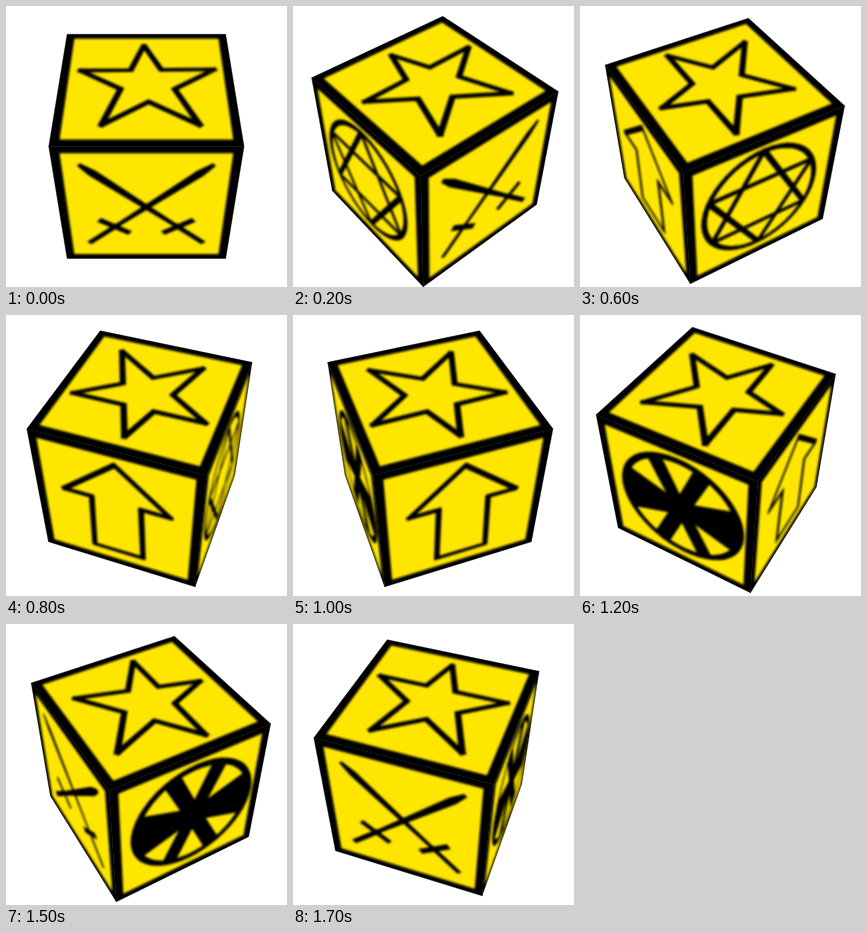
These frames come from a looping animation (281 px wide and 281 px high, 1.8 s). An HTML page:

```html
<!DOCTYPE html>
<html lang="en">
<head>
<meta charset="utf-8">
<title>Turning cube</title>
<style>
html, body { margin: 0; width: 100%; height: 100%; overflow: hidden; background: #fff; }
svg { display: block; width: 100vw; height: 100vh; }
</style>
</head>
<body>
<svg id="stage" viewBox="0 0 281 281">
  <filter id="soft" color-interpolation-filters="sRGB"><feGaussianBlur stdDeviation="1.1"/></filter>
</svg>
<script>
const YELLOW = '#ffe600', BLACK = '#000';
const LOOP = 1800, STEP = 100, TURN = 360 / (LOOP / STEP);
const FOCAL = 597, DIST = 7.53, CENTER = 140.4;
const TILT = Math.SQRT1_2; // sine and cosine of the 45 degree camera pitch
const RAD = Math.PI / 180;
const PEN = 0.072;

// Face shapes are polygons in face units: u to the right, v up, both -1..1.
const square = r => [[-r, r], [r, r], [r, -r], [-r, -r]];
const mirror = ([u, v]) => [-u, v];
const mix = (a, b, k) => a.map((n, i) => n + (b[i] - n) * k);

// A bar from a to b whose width runs from w0 to w1
function taper(a, b, w0, w1, ext = 0) {
  const len = Math.hypot(b[0] - a[0], b[1] - a[1]);
  const dx = (b[0] - a[0]) / len, dy = (b[1] - a[1]) / len;
  const edge = ([x, y], s, w) => [x - dy * w / 2 + dx * s, y + dx * w / 2 + dy * s];
  return [edge(a, -ext, w0), edge(b, ext, w1), edge(b, ext, -w1), edge(a, -ext, -w0)];
}

const line = (a, b, w = PEN) => taper(a, b, w, w, w * 0.35);
const outline = pts => pts.map((p, i) => line(p, pts[(i + 1) % pts.length]));

const polar = (x, y, rx, ry, deg) => [x + rx * Math.cos(deg * RAD), y + ry * Math.sin(deg * RAD)];
const arc = (x, y, rx, ry, from, to, n) =>
  Array.from({ length: n + 1 }, (_, i) => polar(x, y, rx, ry, from + (to - from) * i / n));

// Where the line a-b meets the line c-d
function meet(a, b, c, d) {
  const cross = (p, q, r) => (q[0] - p[0]) * (r[1] - p[1]) - (q[1] - p[1]) * (r[0] - p[0]);
  const k = cross(c, d, a), m = cross(c, d, b);
  return mix(a, b, k / (k - m));
}

// Inner corners lie where the chords between the five tips cross
function pentagram(tips) {
  const tip = i => tips[(i + 5) % 5];
  return outline(tips.flatMap((p, i) => [p, meet(p, tip(i + 2), tip(i - 1), tip(i + 1))]));
}

function sword([tip, end, guardA, guardB]) {
  const neck = mix(tip, end, 0.1), hilt = mix(tip, end, 0.76);
  return [
    taper(tip, neck, 0.05, 0.11),
    taper(neck, hilt, 0.11, 0.06),
    line(hilt, end),
    line(guardA, guardB, 0.085)
  ];
}

function hexagram(x, y, rx, ry) {
  const corners = degs => outline(degs.map(d => polar(x, y, rx, ry, d)));
  return [
    ...outline(arc(x, y, rx, ry, 0, 352.5, 47)),
    ...corners([90, 210, 330]),
    ...corners([270, 156, 24])
  ];
}

function wheelGaps(x, y) {
  const gaps = [];
  for (const pole of [90, 270]) {
    for (let k = -1; k <= 1; k++) {
      const mid = pole + k * 47;
      gaps.push([polar(x, y, 0.26, 0.26, mid), ...arc(x, y, 0.74, 0.74, mid - 15, mid + 15, 8)]);
    }
  }
  return gaps;
}

const star = pentagram([[-.03, .76], [.8, .28], [.57, -.68], [-.48, -.68], [-.78, .26]]);
const blade = [[-.72, .73], [.68, -.65], [.22, -.45], [.53, -.23]];
const halfArrow = [[0, .79], [.65, .18], [.3, .18], [.32, -.73]];

// Side faces sit on the front of the cube at their own turn; the lid lies on top.
const side = (u, v) => [u, v, 1];
const lid = (u, v) => [u, 1, -v];
const faces = [
  { place: lid, turn: 0, ink: star },
  { place: side, turn: 0, ink: [...sword(blade), ...sword(blade.map(mirror))] },
  { place: side, turn: -90, ink: hexagram(-.04, .02, .745, .8) },
  { place: side, turn: -180, ink: outline([...halfArrow, ...halfArrow.slice(1).reverse().map(mirror)]) },
  { place: side, turn: -270, ink: [arc(.05, .02, .83, .83, 360, 0, 48)], gaps: wheelGaps(.05, .02) }
];

function add(parent, tag, attrs) {
  const el = document.createElementNS('http://www.w3.org/2000/svg', tag);
  for (const k in attrs) el.setAttribute(k, attrs[k]);
  return parent.appendChild(el);
}

const stage = document.getElementById('stage');
for (const f of faces) {
  f.group = add(stage, 'g', {});
  f.layers = [[add(f.group, 'path', { fill: BLACK, stroke: BLACK, 'stroke-width': 0.4 }), [square(1)]]];
  const inner = add(f.group, 'g', { filter: 'url(#soft)' });
  const layer = (fill, polys) => f.layers.push([add(inner, 'path', { fill }), polys]);
  layer(YELLOW, [square(0.9)]);
  layer(BLACK, f.ink);
  if (f.gaps) layer(YELLOW, f.gaps);
}

function project([x, y, z], angle) {
  const c = Math.cos(angle), s = Math.sin(angle);
  const rx = x * c + z * s, rz = z * c - x * s;
  const k = FOCAL / (DIST - (y + rz) * TILT);
  return [CENTER + rx * k, CENTER - (y - rz) * TILT * k];
}

function draw(degrees) {
  for (const f of faces) {
    const angle = (degrees + f.turn) * RAD;
    const at = ([u, v]) => project(f.place(u, v), angle);
    const [a, b, c] = square(1).map(at);
    const shown = (b[0] - a[0]) * (c[1] - a[1]) - (b[1] - a[1]) * (c[0] - a[0]) > 0;
    f.group.style.display = shown ? '' : 'none';
    if (!shown) continue;
    for (const [path, polys] of f.layers) {
      path.setAttribute('d', polys.map(poly =>
        'M' + poly.map(p => at(p).map(n => n.toFixed(2)).join(' ')).join('L') + 'Z').join(''));
    }
  }
}

function tick() {
  draw(Math.floor(performance.now() % LOOP / STEP) * TURN);
  requestAnimationFrame(tick);
}
tick();
</script>
</body>
</html>
```
